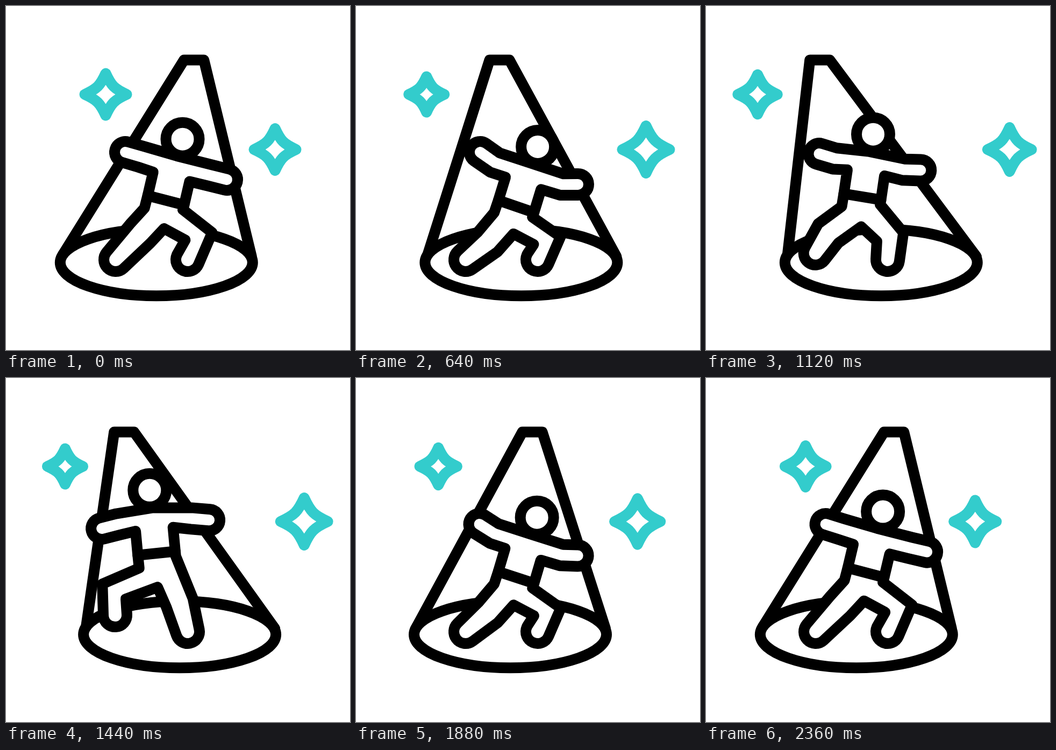
Recreate the animation shown at these times as an HTML page with a canvas. Size 640 by 640 pixels, loop 2400 ms.

```html
<!DOCTYPE html>
<html lang="en">
<head>
<meta charset="utf-8">
<title>Dancer in a spotlight</title>
<style>
  html, body { margin: 0; width: 100%; height: 100%; overflow: hidden; background: #fff; }
  canvas { display: block; width: 640px; height: 640px; }
</style>
</head>
<body>
<canvas id="stage" width="640" height="640"></canvas>
<script>
const ctx = document.getElementById('stage').getContext('2d');
const LOOP = 2400, STEP = 40, TEAL = '#33cccc';

// Joints of the three key poses; bend = [torso tilt in degrees, elbow sag]
const REST = {
  bend: [14.5, 0], waist: [297.5, 361.5], handL: [222, 272], handR: [411, 323],
  crotch: [294, 414], kneeL: [249.5, 423.5], kneeR: [358.5, 428.5], footL: [204, 472]
};
const LOW = {
  bend: [19, 7], waist: [298, 373], handL: [231, 272], handR: [413, 332],
  crotch: [293, 424], kneeL: [245, 439], kneeR: [355.5, 436.5], footL: [204, 472]
};
const KICK = {
  bend: [-6, -2], waist: [280, 326], handL: [178, 280], handR: [378, 264],
  crotch: [282, 389], kneeL: [201, 397], kneeR: [323, 418.5], footL: [203, 441]
};
const FOOT_R = [338, 472];

const ramp = (t, a, b) => {
  const u = Math.min(1, Math.max(0, (t - a) / (b - a)));
  return u * u * (3 - 2 * u);
};
const lerp = (p, q, k) => p.map((v, i) => v + (q[i] - v) * k);
const blend = (a, b, k) =>
  Object.fromEntries(Object.keys(a).map(name => [name, lerp(a[name], b[name], k)]));
const angle = (p, q) => Math.atan2(q[1] - p[1], q[0] - p[0]);

// Outline of a limb: one side of the joint, rounded end, other side
function limb(root, joint, end, half, r) {
  const a = angle(root, joint), b = angle(joint, end);
  const n = Math.atan2(Math.sin(a) + Math.sin(b), Math.cos(a) + Math.cos(b)) - Math.PI / 2;
  const side = s => [joint[0] + s * Math.cos(n), joint[1] + s * Math.sin(n)];
  return [side(half), [...end, r], side(-half)];
}

function outline(pts) {
  const touch = (c, p, side) =>
    angle(c, p) + side * Math.acos(Math.min(1, c[2] / Math.hypot(p[0] - c[0], p[1] - c[1])));
  ctx.beginPath();
  pts.forEach((p, i) => {
    if (p[2]) ctx.arc(...p, touch(p, pts[i - 1], 1), touch(p, pts[(i + 1) % pts.length], -1));
    else ctx.lineTo(...p);
  });
  ctx.closePath();
  ctx.fill();
  ctx.stroke();
}

function dancer(pose) {
  const { waist, crotch, handL, handR, kneeL, kneeR, footL, bend: [tilt, sag] } = pose;
  const rad = tilt * Math.PI / 180, sin = Math.sin(rad), cos = Math.cos(rad);
  // Offset from p in the tilted frame of the torso
  const at = (p, across, up) => [p[0] + across * cos + up * sin, p[1] + across * sin - up * cos];
  // The spine curves a little more the higher it goes
  const spine = (up, curve) => [waist[0] + up * Math.sin(rad * curve), waist[1] - up * Math.cos(rad * curve)];

  const chest = spine(45, 0.9), head = spine(118, 1.05), shoulder = at(chest, 0, 20);
  const hipL = at(waist, -35, -24), hipR = at(waist, 35, -9);
  const waistL = at(waist, -35, 0), waistR = at(waist, 35, 0);
  const arm = hand => {
    const [x, y] = lerp(shoulder, hand, 0.68);
    return limb(shoulder, [x, y + sag], hand, 20, 20);
  };
  const leg = (hip, knee, foot) => limb(lerp(hip, crotch, 0.5), knee, foot, 26, 22);

  ctx.beginPath();
  ctx.arc(...head, 31, 0, 7);
  ctx.fill();
  ctx.stroke();

  outline([
    at(chest, 0, 40), ...arm(handR), at(chest, 35, 0), waistR, hipR,
    ...leg(hipR, kneeR, FOOT_R), crotch, ...leg(hipL, kneeL, footL),
    hipL, waistL, at(chest, -35, 0), ...arm(handL)
  ]);

  ctx.beginPath();
  ctx.moveTo(...waistL);
  ctx.lineTo(...waistR);
  ctx.stroke();
}

function beam(k) {
  const top = 349.7 - 138 * k, base = 279.8 + 46 * k;
  ctx.beginPath();
  ctx.moveTo(base - 174, 462.5);
  ctx.lineTo(top - 18.5, 100.5);
  ctx.lineTo(top + 18.5, 100.5);
  ctx.lineTo(base + 177, 466);
  ctx.stroke();
  ctx.beginPath();
  ctx.ellipse(base, 477.3, 179, 62, 0, 0, 7);
  ctx.stroke();
}

function star(x, y, size) {
  const a = size * 0.27, b = size * 0.41;
  ctx.save();
  ctx.translate(x, y);
  ctx.beginPath();
  ctx.moveTo(0, -size);
  for (let i = 0; i < 4; i++) {
    ctx.bezierCurveTo(a, -b, b, -a, size, 0);
    ctx.rotate(Math.PI / 2);
  }
  ctx.closePath();
  ctx.stroke();
  ctx.restore();
}

function draw(t) {
  ctx.fillStyle = '#fff';
  ctx.fillRect(0, 0, 640, 640);
  ctx.lineWidth = 20;
  ctx.lineJoin = ctx.lineCap = 'round';

  ctx.strokeStyle = '#000';
  beam(ramp(t, 257, 933) - ramp(t, 1333, 2063));
  const low = 1.06 * (t < 1740 ? ramp(t, 0, 760) : (LOOP - t) / 660);
  const kick = ramp(t, 865, 1460) - ramp(t, 1460, 1740);
  dancer(blend(blend(REST, LOW, low), KICK, kick));

  ctx.strokeStyle = TEAL;
  const drift = ramp(t, 0, 1120) - ramp(t, 1120, LOOP);
  const pulse = (1 - Math.cos(t * Math.PI / 200)) / 2;
  star(185.5 - 89.5 * drift, 164.5, 39 - 6.6 * pulse);
  star(500.6 + 64.2 * drift, 267, 39 + 5.5 * pulse);
}

function tick() {
  const t = performance.now() % LOOP;
  draw(Math.floor(t / STEP) * STEP);
  requestAnimationFrame(tick);
}
tick();
</script>
</body>
</html>
```
